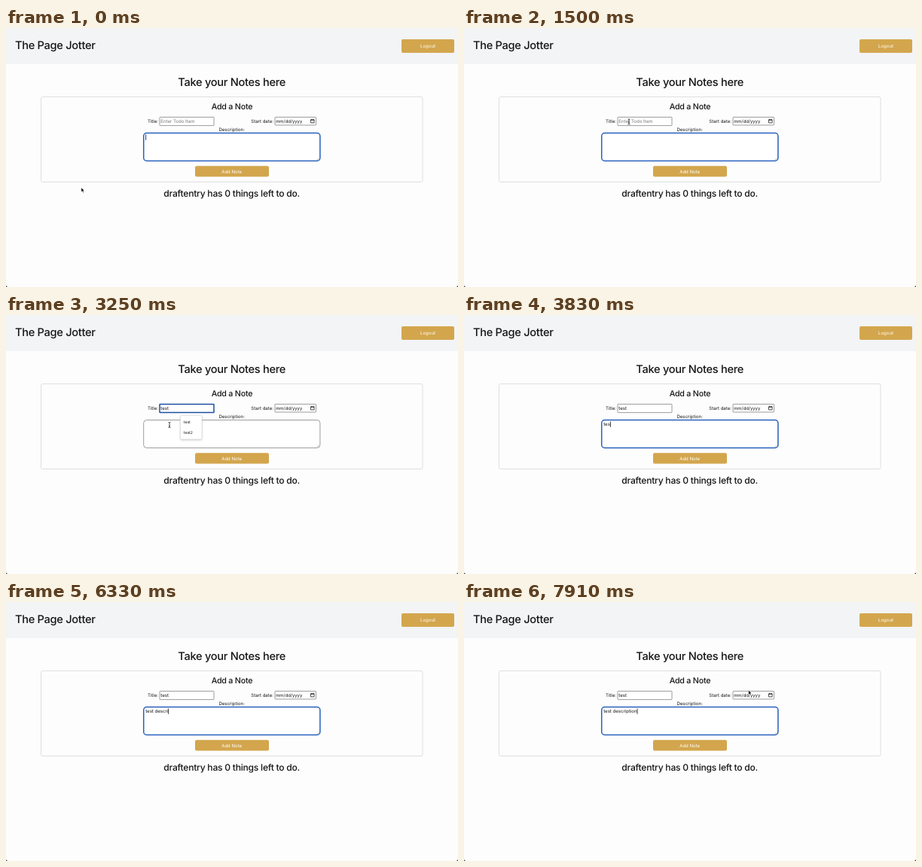
Recreate the animation shown at these times as an HTML page. Size 600x344 px, loop 8000 ms.

```html
<!DOCTYPE html>
<html lang="en">
<head>
<meta charset="utf-8">
<title>Note form</title>
<style>
  html, body { margin: 0; width: 100%; height: 100%; overflow: hidden; background: #fdfdfd; }
  svg { display: block; width: 600px; height: 344px; }
  text { font: 6.05px Inter, sans-serif; fill: #151515; white-space: pre; text-rendering: geometricPrecision; }
  .h2, .h3, .h4 { font-weight: 500; letter-spacing: -.02em; }
  .h2 { font-size: 14.6px; }
  .h3 { font-size: 12.1px; }
  .h4 { font-size: 10.7px; }
  .mid { text-anchor: middle; }
  .button { fill: #d3a64d; }
  .label { fill: #fff; text-anchor: middle; }
  .field { fill: #fff; stroke: #858585; stroke-width: .8; }
  #menu text { font-size: 5.1px; }
  #titleBox.focus { stroke: #1d4f9f; stroke-width: 1.5; }
  #bodyBox.focus { stroke: #2861bd; stroke-width: 1.5; }
</style>
</head>
<body>
<svg viewBox="0 0 600 344">
  <rect width="600" height="344" fill="#fdfdfd"/>
  <rect width="600" height="48" fill="#f3f4f6"/>
  <path d="M0 341Q0 344 3 344H0ZM600 341Q600 344 597 344H600Z" fill="#222"/>
  <text class="h2" x="12" y="27.8">The Page Jotter</text>
  <rect class="button" x="525" y="15" width="70" height="18" rx="2"/>
  <text class="label" x="560" y="26.2">Logout</text>

  <text class="h2 mid" x="299.7" y="76.8">Take your Notes here</text>
  <rect x="46.5" y="91.5" width="506.5" height="113" rx="2" fill="none" stroke="#dedfe0"/>
  <text class="h4 mid" x="300" y="108.4">Add a Note</text>
  <text x="188" y="126.2">Title:</text>
  <rect id="titleBox" class="field" x="204" y="118.4" width="72" height="11.2" rx=".6"/>
  <text id="hint" x="205.3" y="126.2" style="fill:#777">Enter Todo Item</text>
  <text id="titleText" x="205.3" y="126.2"></text>
  <text x="325.3" y="126">Start date:</text>
  <rect class="field" x="357" y="118.4" width="54.5" height="10.6" rx=".6"/>
  <text x="358.2" y="126" style="font-size:5.9px">mm/dd/yyyy</text>
  <path d="M404.5 121.9h4.6v4h-4.6ZM404.5 122.2h4.6M405.5 121v1M408.1 121v1" fill="none" stroke="#222" stroke-width=".8"/>
  <text class="mid" x="299.7" y="136.6">Description:</text>
  <rect id="bodyBox" class="field" x="182.7" y="139.5" width="234.2" height="37" rx="4"/>
  <path d="M412.7 175.3l2.8-2.8M414.2 175.5l1.4-1.4" stroke="#888" stroke-width=".5"/>
  <text id="bodyText" x="185.2" y="147.4"></text>
  <rect class="button" x="251" y="183.3" width="98" height="14.2" rx="2"/>
  <text class="label" x="299.7" y="192.7">Add Note</text>
  <text class="h3 mid" x="299.7" y="224.2">draftentry has 0 things left to do.</text>

  <rect id="caret" width=".8" height="7.4" fill="#111"/>
  <g id="menu">
    <rect x="231.5" y="133.5" width="28.5" height="31.5" rx="1.5" fill="#fff" stroke="#ddd" stroke-width=".7"
      style="filter:drop-shadow(0 1px 1px #0003)"/>
    <text x="235.8" y="144.1">test</text>
    <text x="235.8" y="158.1">test2</text>
  </g>
  <path id="arrow" d="M0 0V5.8L1.4 4.6L2.4 6.8L3.4 6.4L2.5 4.2H4.3Z" fill="#000" stroke="#fff" stroke-width=".5"/>
  <path id="beam" d="M-1.5-3.6Q0-3.6 0-2.6Q0-3.6 1.5-3.6M0-2.8V2.8M-1.5 3.6Q0 3.6 0 2.6Q0 3.6 1.5 3.6M-.8 1.2H.8"
    fill="none" stroke="#222" stroke-width=".8"/>
</svg>
<script>
const LOOP = 8000, STEP = 1000 / 12;
const el = id => document.getElementById(id);
const show = (id, on) => el(id).setAttribute("visibility", on ? "visible" : "hidden");

const fields = {
  title: { text: "test", keys: [2000, 2080, 2410, 2580], x: 205.3, y: 120.3 },
  body: {
    text: "test description", x: 185.2, y: 141.5,
    keys: [3660, 3750, 3830, 3910, 4750, 4910, 5080, 5250, 5580, 6160, 6330, 6500, 6580, 6660, 6750, 6830]
  }
};
const focusChanges = [[-420, "body"], [1660, "title"], [3330, "body"]];

// Each stroke: start, end, from x, y, to x, y, time when the pointer hides
const strokes = [
  [0, 160, 99.8, 212, 147.3, 193.5, 330],
  [330, 1080, 147.3, 193.5, 219, 124.5, 2000],
  [2830, 3250, 219, 124.5, 217, 146, 3660],
  [7580, 7910, 217, 146, 400.4, 113.2, LOOP]
];

function drawPointer(time) {
  const t = Math.floor((time + 4) / STEP) * STEP;
  const stroke = strokes.find(s => time >= s[0] && time < s[6]);
  if (!stroke) { show("arrow", false); show("beam", false); return; }
  const [start, end, x0, y0, x1, y1] = stroke;
  const p = Math.min(1, Math.max(0, (t - start + 4) / (end - start)));
  const ease = p * p * (3 - 2 * p);
  const x = x0 + (x1 - x0) * ease, y = y0 + (y1 - y0) * ease;
  const inside = (l, top, r, b) => x > l && x < r && y > top && y < b;
  const overText = inside(204, 118, 276, 130) || inside(183, 140, 417, 177);
  for (const id of ["arrow", "beam"]) el(id).setAttribute("transform", `translate(${x} ${y})`);
  show("arrow", !overText);
  show("beam", overText);
}

function draw(time) {
  const [since, active] = focusChanges.filter(f => time >= f[0]).pop();
  for (const name in fields) {
    const { text, keys } = fields[name];
    el(name + "Text").textContent = text.slice(0, keys.filter(k => time >= k).length);
    el(name + "Box").classList.toggle("focus", name === active);
  }
  const { keys, x, y } = fields[active];
  const lastKey = Math.max(since, ...keys.filter(k => time >= k));
  el("caret").setAttribute("x", x + .1 + el(active + "Text").getComputedTextLength());
  el("caret").setAttribute("y", y);
  show("caret", Math.floor((time - lastKey) / 500) % 2 === 0);
  show("hint", time < fields.title.keys[0]);
  show("menu", time >= 2000 && time < 3330);
  drawPointer(time);
}

const origin = performance.now();
function tick() {
  draw((performance.now() - origin) % LOOP);
  requestAnimationFrame(tick);
}
tick();
</script>
</body>
</html>
```
